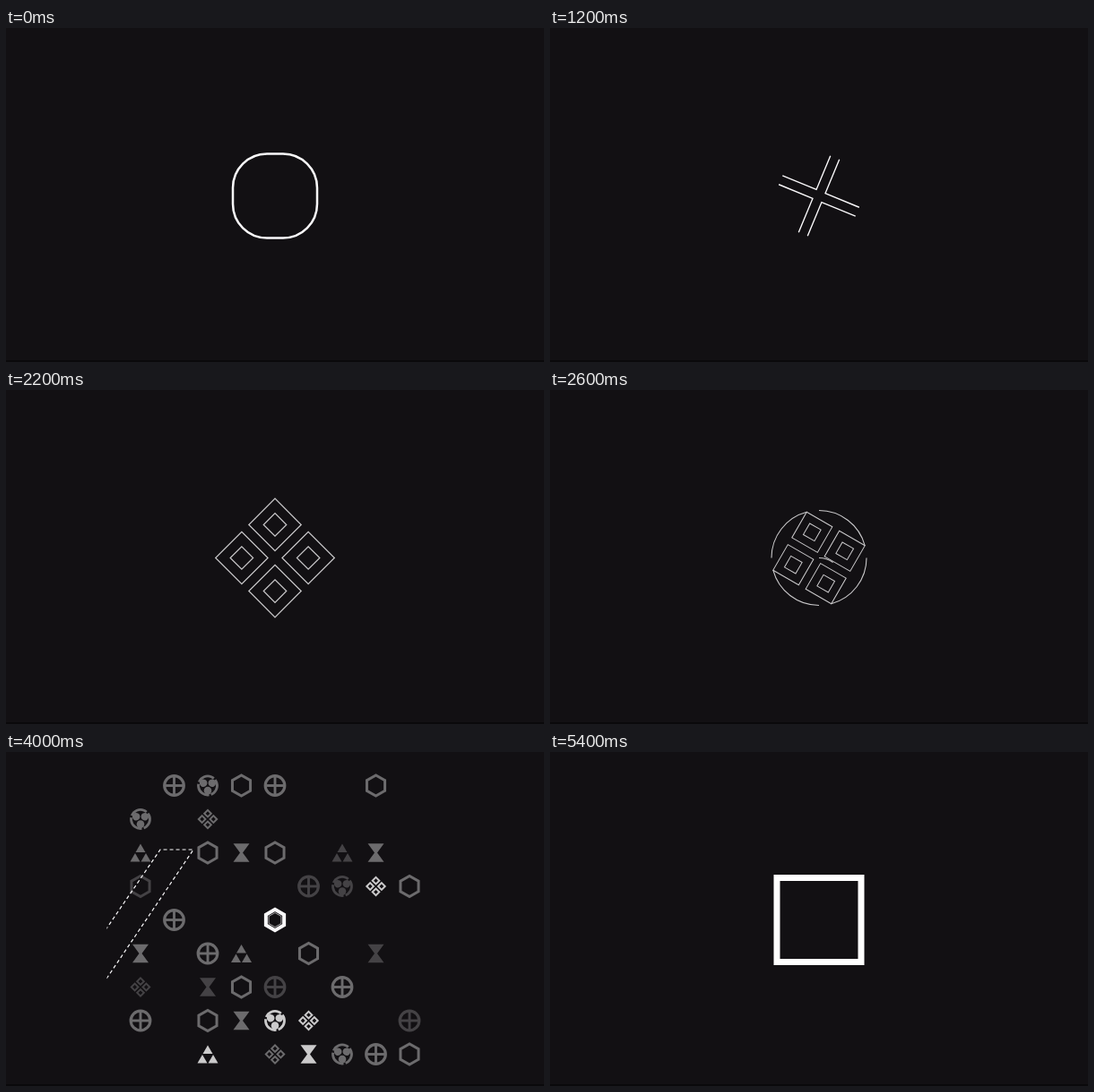
An HTML page with a canvas that plays this animation: 600 px wide and 373 px high, repeating every 5600 ms.

```html
<!DOCTYPE html>
<html lang="en">
<head>
<meta charset="utf-8">
<title>Geometric symbols</title>
<style>
  html, body { margin: 0; width: 100%; height: 100%; overflow: hidden; background: #121013; }
  canvas { display: block; }
</style>
</head>
<body>
<canvas id="stage" width="600" height="373"></canvas>
<script>
const g = document.getElementById('stage').getContext('2d');
const LOOP = 5600, STEP = 200, TAU = 2 * Math.PI, RAD = Math.PI / 180;
const BG = '#121013', WHITE = '#faf9fb', SOFT = '#c9c8ca';

const clamp = v => Math.max(0, Math.min(1, v));
const mix = (a, b, p) => a + (b - a) * p;
const span = (t, a, b) => clamp((t - a) / (b - a));
const ease = p => p * p * (3 - 2 * p);

function at(x, y, turn, scale, draw) {
  g.save();
  g.translate(x, y);
  g.rotate(turn * RAD);
  g.scale(scale, scale);
  draw();
  g.restore();
}

function trace(points, closed) {
  g.beginPath();
  points.forEach(([x, y]) => g.lineTo(x, y));
  if (closed) g.closePath();
}

function stroke(color, width) {
  g.strokeStyle = color;
  g.lineWidth = width;
  g.stroke();
}

function line(points, color, width, closed) {
  trace(points, closed);
  stroke(color, width);
}

function fill(points, color) {
  trace(points);
  g.fillStyle = color;
  g.fill();
}

function arc(r, from, to, color, width, x = 0, y = 0) {
  g.beginPath();
  g.arc(x, y, r, from * RAD, to * RAD);
  stroke(color, width);
}

function dot(x, y, r, color) {
  g.beginPath();
  g.arc(x, y, r, 0, TAU);
  g.fillStyle = color;
  g.fill();
}

const hexagon = r => [30, 90, 150, 210, 270, 330].map(a =>
  [r * Math.cos(a * RAD), r * Math.sin(a * RAD)]);

function square(x, y, half, color, width) {
  g.beginPath();
  g.rect(x - half, y - half, 2 * half, 2 * half);
  stroke(color, width);
}

function wheel(color, ring = 12, bar = 11, reach = 41) {
  arc(47 - ring / 2, 0, 360, color, ring);
  line([[-reach, 0], [reach, 0]], color, bar);
  line([[0, -reach], [0, reach]], color, bar);
}

// Small symbols, keyed by the letters used in the grid
const icons = {
  p: c => at(0, 0, 0, 0.264, () => wheel(c)),
  h: c => line(hexagon(11.6), c, 3, true),
  x: c => fill([[-9, -10.3], [9, -10.3], [1.5, 0], [9, 10.3], [-9, 10.3], [-1.5, 0]], c),
  f: c => [[0, -10], [-6, 0.5], [6, 0.5]].forEach(([x, y]) =>
    fill([[x, y], [x + 5.5, y + 9.5], [x - 5.5, y + 9.5]], c)),
  d: c => at(0, 0, 45, 1, () => {
    for (const x of [-4.5, 4.5]) for (const y of [-4.5, 4.5]) square(x, y, 2.7, c, 2);
  }),
  t: c => {
    for (let k = 0; k < 3; k++) at(0, 0, 120 * k - 30, 1, () => {
      dot(5.6, 0, 4.3, c);
      arc(10.5, -8, 100, c, 2.8);
    });
  }
};

// Symbol and brightness for each cell
const cells = ['.pthp..h.', 't.d......', 'f.hxh.fx.', 'h....ptdh', '.p.......',
  'x.pf.h.x.', 'd.xhp.p..', 'p.hxtd..p', '..f.dxtph'];
const levels = ['022220020', '202000000', '202220120', '100001132', '020000000',
  '202202010', '101210200', '202233001', '003023222'];
const shades = [0, 0.21, 0.38, 0.78];

function grid(t) {
  const glow = t < 4000 ? 0.4 : mix(1, 0.2, span(t, 4200, 4600));
  cells.forEach((row, j) => [...row].forEach((key, i) => {
    if (key === '.') return;
    const v = shades[levels[j][i]] * glow;
    const c = `rgb(${mix(18, 255, v)},${mix(16, 255, v)},${mix(19, 255, v)})`;
    at((i - 4) * 37.5, (j - 4) * 37.5, 0, 1, () => icons[key](c));
  }));
}

function dashes(t) {
  const s = (t - 4000) * 0.6;
  g.save();
  g.beginPath();
  g.rect(-187.5, -187.5, 375, 375);
  g.clip();
  g.translate(s * 0.67, -s);
  g.setLineDash([4, 3]);
  line([[-248, 98], [-128, -78.5], [-91, -78.5], [-248, 155]], WHITE, 1.2);
  g.restore();
}

function opening(t) {
  if (t < 200) {
    g.beginPath();
    g.roundRect(-47, -47, 94, 94, 38);
    stroke(WHITE, 2.5);
    return;
  }
  const p = ease(span(t, 0, 800));
  wheel(WHITE, mix(2.5, 12, p), mix(1, 11, p), mix(188, 41, span(t, 400, 800)));
}

function crossing(t) {
  const p = span(t, 1200, 1800) * span(t, 2200, 1800);
  if (t < 1200) arc(46, 0, 360, WHITE, 2);
  at(0, 0, 45 * ease(span(t, 1000, 1400)), 1, () => {
    for (let k = 0; k < 4; k++) at(0, 0, 90 * k, 1, () =>
      line([[5.4, 46.3], [5.4, 5.4], [46.3, 5.4]], WHITE, 1.4));
  });
  if (!p) return;
  for (const side of [0, 180]) at(0, 0, side, 1, () => {
    const end = mix(47, 147.5, p);
    g.setLineDash([1.3, 1]);
    line([[47, 0], [end, 0]], SOFT, 1);
    g.setLineDash([]);
    g.fillStyle = WHITE;
    for (const x of [47, mix(47, 97.5, p)]) g.fillRect(x - 2, -2, 4, 4);
    dot(end, 0, 2.1, WHITE);
    line([[end - 12, 0], [end, -12], [end + 12, 0], [end, 12]], WHITE, 1.1, true);
  });
}

function tiles(t) {
  const turn = t < 2400 ? -45 : mix(-15, 30, span(t, 2400, 2600));
  at(0, 0, turn, mix(1.25, 1, span(t, 2200, 2400)), () => {
    for (const x of [-21, 21]) for (const y of [-21, 21]) {
      square(x, y, 16.5, SOFT, 1);
      square(x, y, 7.2, SOFT, 1);
    }
  });
  for (let k = 0; k < 4; k++) arc(53, 90 * k, 90 * k + 45 + turn, SOFT, 1.1);
}

function swirl(t) {
  for (let k = 0; k < 3; k++) {
    const p = span(t, 2520 + 100 * k, 2920 + 100 * k);
    if (p) at(0, 0, 120 * k, 1, () => arc(26.5, -90, -90 + 180 * p, SOFT, 1.1, 0, 26.5));
  }
}

function hexagons(t) {
  const p = ease(span(t, 3400, 4000));
  const outer = t < 3400 ? mix(141, 53, span(t, 3000, 3400)) : mix(53, 11.7, p);
  line(hexagon(outer), WHITE, mix(1.3, 4, p), true);
  line(hexagon(mix(37.5, 8, p)), SOFT, mix(1.1, 0.8, p), true);
}

function paint(t) {
  g.fillStyle = BG;
  g.fillRect(0, 0, 600, 373);
  at(300, 187.5, 0, 1, () => {
    if (t < 1000) opening(t);
    else if (t < 2200) crossing(t);
    else if (t < 2800) tiles(t);
    else if (t < 3200) arc(53, 0, 360, SOFT, 1.1);
    if (t >= 2600 && t < 3200) swirl(t);
    if (t >= 3800 && t < 4800) grid(t);
    if (t >= 4000 && t < 4800) dashes(t);
    if (t >= 3200 && t < 4600) hexagons(t);
    if (t >= 4600) square(0, 0, mix(12, 47, span(t, 4400, 4800)), '#fff', mix(4, 7, span(t, 4400, 4800)));
  });
  g.fillStyle = '#0a090b';
  g.fillRect(0, 371, 600, 2);
}

const start = performance.now();
function tick() {
  const t = (performance.now() - start) % LOOP;
  paint(Math.floor(t / STEP) * STEP);
  requestAnimationFrame(tick);
}
tick();
</script>
</body>
</html>
```
